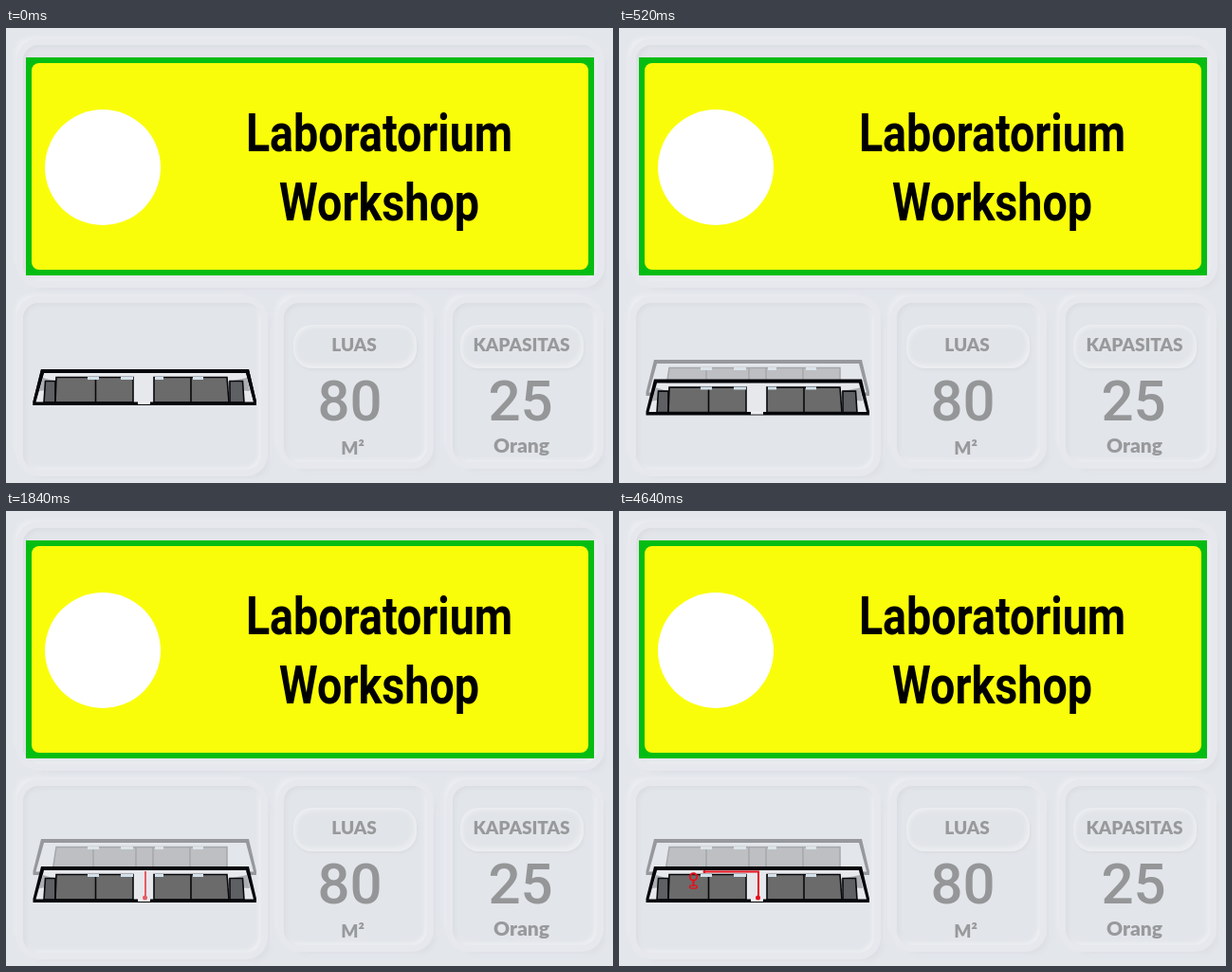
Write an HTML page that moves like this. It is 640 px wide and 480 px high and loops after 5080 ms.

```html
<!DOCTYPE html>
<html lang="id">
<head>
<meta charset="utf-8">
<title>Laboratorium Workshop</title>
<style>
  html, body { margin: 0; width: 100%; height: 100%; overflow: hidden; background: #e3e6eb; }
  .panel, .pill, svg { position: absolute; box-sizing: border-box; }
  .panel {
    border-radius: 16px;
    background: #e2e5ea;
    box-shadow: 0 0 0 7px #e6e8ed, -8px -8px 5px #eceef2, 8px 8px 5px #dcdfe4,
      inset 2px 2px 4px #d9dce1, inset -2px -2px 4px #f0f1f4;
  }
  .pill {
    top: 313px; width: 130px; height: 46px;
    border-radius: 20px;
    background: #e1e4e8;
    box-shadow: inset 2px 2px 5px #eef0f3, inset -3px -4px 5px #eceef1, 1px 2px 3px #dadde2;
  }
  svg { left: 0; top: 0; }
  text { text-anchor: middle; }
  .title { font: 700 56px Roboto, sans-serif; }
  .label { font: 900 19px Lato, sans-serif; fill: #98999b; }
  .value { font: 500 60px Roboto, sans-serif; fill: #959698; }
  .route { fill: none; stroke: #e8101c; stroke-width: 2; }
</style>
</head>
<body>
<div class="panel" style="left:18px;top:18px;width:606px;height:249px"></div>
<div class="panel" style="left:18px;top:290px;width:251px;height:176px"></div>
<div class="panel" style="left:293px;top:290px;width:151px;height:168px"></div>
<div class="panel" style="left:471px;top:290px;width:152px;height:168px"></div>
<div class="pill" style="left:303px"></div>
<div class="pill" style="left:479px"></div>

<svg width="640" height="480" viewBox="0 0 640 480">
  <rect x="21" y="31" width="599" height="230" fill="#05bd12"/>
  <rect x="27" y="37" width="587" height="218" rx="8" fill="#fafd0a"/>
  <circle cx="102" cy="147" r="61" fill="#fff"/>

  <g class="title" transform="translate(393.5 0) scale(.832 1)">
    <text y="130.5">Laboratorium</text>
    <text y="203">Workshop</text>
  </g>

  <text class="label" x="367" y="341">LUAS</text>
  <text class="value" x="362.5" y="414">80</text>
  <text class="label" x="365.5" y="450">M²</text>
  <text class="label" x="543.5" y="341">KAPASITAS</text>
  <text class="value" x="542.5" y="414">25</text>
  <text class="label" x="543.5" y="448" style="font-size:21px">Orang</text>

  <defs>
    <g id="windows" fill="#d2e0ea">
      <path d="M86 383h12v3h-12z M121 383h13v3h-13z M157 383h9v3h-9z M197 383h11v3h-11z"/>
    </g>
    <path id="inside" fill="#e6e8ec" d="M40 379H253L261 410H31Z"/>
    <path id="shell" fill="#05060a" fill-rule="evenodd"
      d="M37 375H256L264 409V413H28.5V409Z M40 379L31.5 409.5H261L253 379Z"/>
  </defs>

  <g id="upper">
    <use href="#inside"/>
    <path fill="#777" stroke="#333" stroke-width="1.5"
      d="M53 383.5H233V409H49Z M92 384V409 M137 384V409 M155 384V409 M194 384V409"/>
    <use href="#windows"/>
    <use href="#shell"/>
  </g>

  <g id="lower">
    <use href="#inside"/>
    <path fill="#a9adb2" d="M39 384L53 388V396L35 398Z M254 384L234 388V396L257 398Z"/>
    <path fill="#5f6064" stroke="#08090c" stroke-width="1.6"
      d="M41.5 387.5H52V410H40Z M236 387.5H249.5L251 410H236Z"/>
    <path fill="#6b6b6b" stroke="#08090c" stroke-width="1.6"
      d="M53 383.5H134V410H52Z M156 383.5H233L235 410H156Z M94.5 384V410 M195 384V410"/>
    <use href="#windows"/>
    <use href="#shell"/>
    <path fill="#eef0f3" d="M139 409h13v3h-13z"/>
  </g>

  <g id="entry" class="route">
    <path d="M147 409V380"/>
    <circle cx="146.5" cy="408" r="2.5" fill="#e8101c" stroke="none"/>
  </g>
  <g id="turn" class="route">
    <path d="M148 380.5H89"/>
    <circle cx="90" cy="380.5" r="1.5" fill="#e8101c" stroke="none"/>
    <circle cx="78.5" cy="386" r="3.7"/>
    <path d="M78.5 390V396"/>
    <ellipse cx="78.5" cy="396.5" rx="4" ry="1.6" stroke-width="1.4"/>
  </g>
</svg>

<script>
  const LOOP = 5080, STEP = 40;
  const [upper, lower, entry, turn] =
    ["upper", "lower", "entry", "turn"].map(id => document.getElementById(id));
  const ramp = (t, from, to) => Math.min(1, Math.max(0, (t - from) / (to - from)));
  const shiftY = (el, y) => el.setAttribute("transform", `translate(0 ${y.toFixed(2)})`);

  function draw(time) {
    const t = Math.floor((time % LOOP) / STEP) * STEP;
    const split = Math.sin(ramp(t, 0, 1040) * Math.PI / 2);
    shiftY(lower, -15 * (1 - split));
    shiftY(upper, -15 - 14 * split);
    upper.style.opacity = Math.max(.34, 1 - 1.1 * split);
    entry.style.opacity = ramp(t, 1480, 2040);
    turn.style.opacity = ramp(t, 2040, 2560);
  }

  const start = performance.now();
  function tick() {
    draw(performance.now() - start);
    requestAnimationFrame(tick);
  }
  tick();
</script>
</body>
</html>
```
